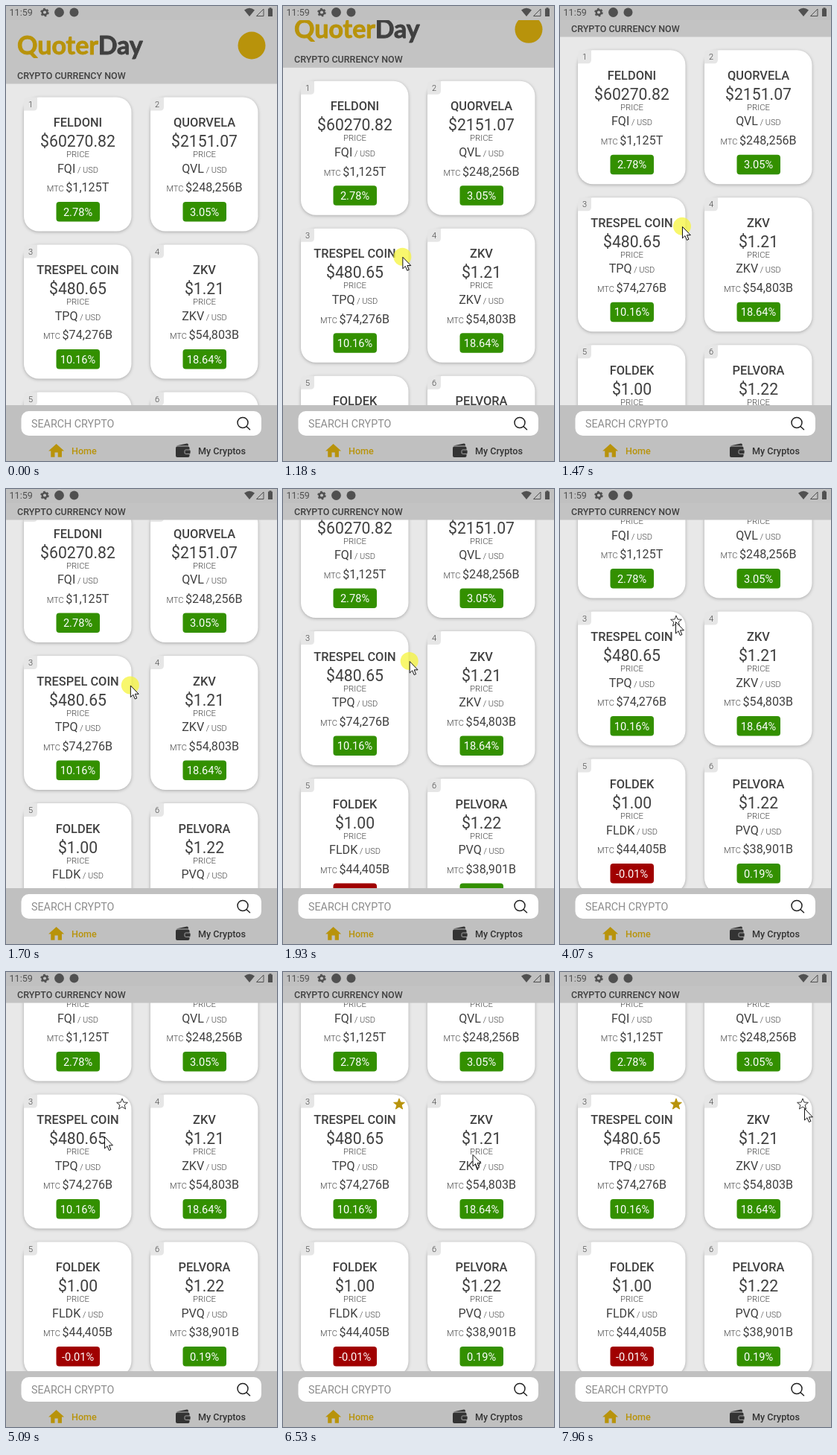
These frames come from a looping animation (364x611 px, 8000 ms). An HTML page:

```html
<!DOCTYPE html>
<html lang="en">
<head>
<meta charset="utf-8">
<title>Crypto prices</title>
<style>
  html, body { margin: 0; width: 100%; height: 100%; overflow: hidden; background: #e8e8e8; }
  svg { display: block; font-family: Roboto, "Liberation Sans", sans-serif; fill: #404040; }
  .mid { text-anchor: middle; }
  .name { font-size: 16.4px; font-weight: 500; }
  .price { font-size: 21.2px; }
  .label { font-size: 11.4px; font-weight: 300; }
  .big { font-size: 16.1px; }
  .small { font-size: 11px; font-weight: 300; }
  .change { font-size: 14.6px; fill: #fff; }
  .card { fill: #fff; filter: drop-shadow(0 1.5px 2px rgba(0, 0, 0, .28)); }
  .gold { fill: #b8930b; }
  .logo { font: 700 34px Lato, sans-serif; stroke-width: .9; stroke-linejoin: round; }
  .tab { font-size: 12.6px; font-weight: 500; }
  .star { fill: none; stroke: #333; stroke-linejoin: round; }
  .star.on { fill: #b8930b; stroke: #b8930b; }
  .hide { display: none; }
</style>
</head>
<body>
<svg width="364" height="611" viewBox="0 0 364 611">
  <rect width="364" height="611" fill="#e8e8e8"/>
  <g id="list"></g>

  <g id="header">
    <rect y="-70" width="364" height="174.5" fill="#c3c3c3"/>
    <text class="logo" x="15" y="65"><tspan class="gold" stroke="#b8930b">Quoter</tspan><tspan stroke="#404040">Day</tspan></text>
    <circle class="gold" cx="330" cy="53" r="18.5"/>
    <text x="15" y="98" font-size="12.5" font-weight="500">CRYPTO CURRENCY NOW</text>
  </g>

  <g fill="#505050">
    <rect width="364" height="19" fill="#c0c0c0"/>
    <text x="4.5" y="13.2" font-size="12.6">11:59</text>
    <g fill="none" stroke="#505050">
      <circle cx="52" cy="8.5" r="3.3" stroke-width="2.4"/>
      <circle cx="52" cy="8.5" r="4.9" stroke-width="1.8" stroke-dasharray="2.6 2.53"/>
    </g>
    <circle cx="71.5" cy="8.5" r="6.4"/>
    <circle cx="91.5" cy="8.5" r="6"/>
    <path d="M320 5.5Q327 .2 334 5.5L327 14Z"/>
    <path d="M336.5 13.5H346V4Z" fill="none" stroke="#505050"/>
    <path d="M352 3.5h1.5V2.3h3v1.2h1.5V14h-6Z"/>
  </g>

  <g>
    <rect y="536" width="364" height="75" fill="#c0c0c0"/>
    <rect x="20.5" y="544" width="322.5" height="33" rx="10" fill="#fff"/>
    <text x="34" y="566" font-size="14.3" fill="#8c8c8c">SEARCH CRYPTO</text>
    <g fill="none" stroke="#222" stroke-width="1.5" stroke-linecap="round">
      <circle cx="318" cy="559.5" r="7"/>
      <path d="M323.2 564.7L327.5 568.8"/>
    </g>
    <path class="gold" transform="translate(55 584.8) scale(1.05)" d="M10 20v-6h4v6h5v-8h3L12 3 2 12h3v8z"/>
    <text class="tab gold" x="88" y="601.5">Home</text>
    <g fill="#333">
      <path d="M228.5 590.5L243 587.6Q245 587.5 245 590V590.5Z"/>
      <rect x="228" y="591.5" width="18.5" height="14.5" rx="2"/>
      <rect x="240" y="596" width="8" height="5.5" rx="1.5" stroke="#c0c0c0" stroke-width=".8"/>
      <text class="tab" x="258" y="601.5">My Cryptos</text>
    </g>
  </g>

  <g id="cursor" class="hide">
    <circle id="press" r="12" fill="#f6f43c" opacity=".75"/>
    <path d="M.5 .5V16L4 12.7 6.4 18.5 8.9 17.5 6.5 11.8H11.4Z" fill="#fff" stroke="#111"/>
  </g>
</svg>

<script>
const LOOP = 8000, ENTER = 160, SCROLL = 156, HEADER_TRAVEL = 63;
const DRAG_START = 1030, DRAG_END = 2116;
const $ = id => document.getElementById(id);

const coins = [
  ["FELDONI", "60270.82", "FQI", "1,125T", "2.78%"],
  ["QUORVELA", "2151.07", "QVL", "248,256B", "3.05%"],
  ["TRESPEL COIN", "480.65", "TPQ", "74,276B", "10.16%"],
  ["ZKV", "1.21", "ZKV", "54,803B", "18.64%"],
  ["FOLDEK", "1.00", "FLDK", "44,405B", "-0.01%"],
  ["PELVORA", "1.22", "PVQ", "38,901B", "0.19%"]
];

const starPoints = Array.from({ length: 10 }, (_, i) => {
  const r = i % 2 ? 3.3 : 7.8, a = i * Math.PI / 5;
  return `${(r * Math.sin(a)).toFixed(2)},${(-r * Math.cos(a)).toFixed(2)}`;
}).join(" ");

const line = (cls, y, text) => `<text class="mid ${cls}" x="72.5" y="${y}">${text}</text>`;

$("list").innerHTML = coins.map(([name, price, code, cap, change], i) => `
  <g transform="translate(${24 + i % 2 * 170} ${122.5 + (i >> 1) * 198})">
    <rect class="card" width="144.5" height="180" rx="20"/>
    <path d="M0 18V5Q0 0 5 0H18V13Q18 18 13 18Z" fill="#e6e6e6"/>
    <text class="mid small" x="9" y="13">${i + 1}</text>
    ${line("name", 39.7, name)}
    ${line("price", 66.7, "$" + price)}
    ${line("label", 80.6, "PRICE")}
    ${line("big", 101.3, `${code}<tspan class="small"> / USD</tspan>`)}
    ${line("big", 126.8, `<tspan class="small">MTC </tspan>$${cap}`)}
    <rect x="43.5" y="140.5" width="58.5" height="26.5" rx="4" fill="${change[0] === "-" ? "#a00000" : "#339000"}"/>
    ${line("change", 159.2, change)}
    <polygon id="star${i + 1}" class="star hide" transform="translate(132 13.2)" points="${starPoints}"/>
  </g>`).join("");

// Each stroke of the pointer: start, end, then evenly timed points
const strokes = [
  [160, 390, [282, 598], [153, 420]],
  [590, DRAG_END, [153, 420], [172, 205]],
  [2220, 3870, [172, 205], [110, 219], [32, 290], [100, 305], [112, 172], [104, 222], [155, 178]],
  [4220, 4840, [155, 178], [132, 221]],
  [6130, 7740, [132, 221], [200, 236], [255, 245], [326, 275], [265, 311], [225, 260], [280, 200], [332, 205], [328, 178]],
  [7950, 7960, [328, 178], [328, 183]]
];

const progress = (t, a, b) => Math.min(1, Math.max(0, (t - a) / (b - a)));

// Catmull-Rom curve with mirrored end points, so two points give a straight line
function spline(points, u) {
  const last = points.length - 1;
  const i = Math.min(last - 1, Math.floor(u * last)), s = u * last - i;
  return [0, 1].map(axis => {
    const b = points[i][axis], c = points[i + 1][axis];
    const a = i > 0 ? points[i - 1][axis] : 2 * b - c;
    const d = i + 2 <= last ? points[i + 2][axis] : 2 * c - b;
    return b + s / 2 * (c - a + s * (2 * a - 5 * b + 4 * c - d + s * (3 * (b - c) + d - a)));
  });
}

function pointer(t) {
  const [from, to, ...points] = strokes.findLast(s => s[0] <= t) ?? strokes[0];
  return spline(points, progress(t, from, to));
}

const show = (id, on) => $(id).classList.toggle("hide", !on);
const move = (id, x, y) => $(id).setAttribute("transform", `translate(${x.toFixed(2)} ${y.toFixed(2)})`);
const within = (t, a, b) => t >= a && t < b;

function draw(now) {
  const t = now % LOOP, y = SCROLL * progress(t, DRAG_START, DRAG_END);
  move("list", 0, -y);
  move("header", 0, -Math.min(y, HEADER_TRAVEL));
  show("cursor", t >= ENTER);
  move("cursor", ...pointer(t));
  show("press", within(t, DRAG_START, 2250) || within(t, 4020, 4070) || within(t, 7770, 7810));
  show("star3", t >= 4070);
  $("star3").classList.toggle("on", t >= 6150);
  show("star4", t >= 7810);
}

const start = performance.now();
function tick() {
  draw(performance.now() - start);
  requestAnimationFrame(tick);
}
tick();
</script>
</body>
</html>
```
